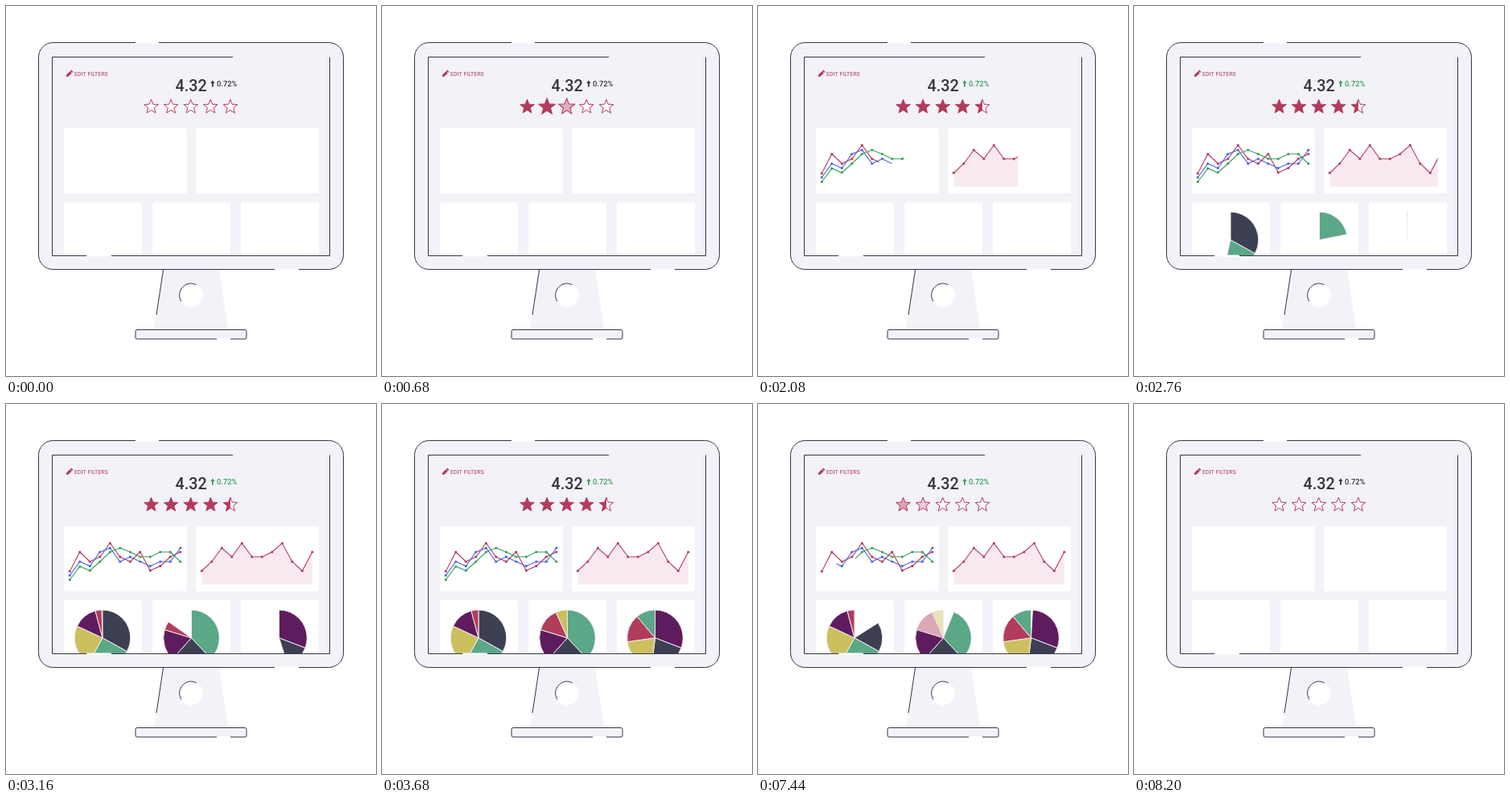
These frames come from a looping animation (460x460 px, 8240 ms). An HTML page with a canvas:

```html
<!DOCTYPE html>
<html lang="en">
<head>
<meta charset="utf-8">
<title>Rating dashboard</title>
<style>
html, body { margin: 0; width: 100%; height: 100%; overflow: hidden; background: #fff; }
canvas { display: block; width: 460px; height: 460px; }
</style>
</head>
<body>
<canvas id="stage"></canvas>
<script>
const LOOP = 8240;
const INK = '#35354a', PANEL = '#f2f2f8', RED = '#b43a5d';
const PIE = { dark: '#3c4052', green: '#5aa888', yellow: '#cbc05e', purple: '#5e1c5e', red: '#b23c5c' };

const canvas = document.getElementById('stage');
const c = canvas.getContext('2d');
const dpr = window.devicePixelRatio || 1;
canvas.width = canvas.height = 460 * dpr;

const progress = (t, start, dur) => Math.min(1, Math.max(0, (t - start) / dur));
const sine = p => (1 - Math.cos(Math.PI * p)) / 2;
const quad = p => p < .5 ? 2 * p * p : 1 - 2 * (1 - p) ** 2;
const mix = (a, b, p) => `rgb(${a.map((v, i) => Math.round(v + (b[i] - v) * p))})`;

function path(points, close) {
  c.beginPath();
  points.forEach(([x, y]) => c.lineTo(x, y));
  if (close) c.closePath();
}

function stroke(color, width = 1) {
  c.strokeStyle = color;
  c.lineWidth = width;
  c.stroke();
}

function fill(color) {
  c.fillStyle = color;
  c.fill();
}

function line(points, color = INK, width = 1) {
  path(points);
  stroke(color, width);
}

function box(x, y, w, h, r, color, edge) {
  c.beginPath();
  c.roundRect(x, y, w, h, r);
  fill(color);
  if (edge) stroke(edge);
}

function text(s, x, y, size, weight, color) {
  c.font = `${weight} ${size}px Roboto, sans-serif`;
  c.fillStyle = color;
  c.fillText(s, x, y);
}

function monitor() {
  path([[195, 328], [265, 328], [276, 402], [184, 402]], true);
  fill(PANEL);
  line([[195.5, 328], [187, 384]]);
  c.beginPath();
  c.arc(230, 359.5, 15, 0, 7);
  fill('#fff');
  c.beginPath();
  c.arc(230, 359.5, 14.5, 2.58, 5.2);
  stroke(INK);
  box(161, 402.5, 138, 11.5, 2, PANEL, INK);
  box(40.5, 45.5, 379, 282, 18, PANEL, INK);
  line([[161, 45.5], [190, 45.5]], '#fff', 2);
  line([[334, 327.5], [364, 327.5]], '#fff', 2);
  line([[262, 414], [279, 414]], '#fff', 2);
}

function bezel() {
  line([[282, 63.5], [57.5, 63.5], [57.5, 310.5], [402.5, 310.5], [402.5, 63.5]]);
  line([[100, 310.5], [131, 310.5]], '#fff', 2);
}

function header(tint) {
  c.save();
  c.translate(78.8, 84.2);
  c.rotate(-Math.PI / 4);
  path([[-5.5, 0], [-3.5, -1.6], [2.4, -1.6], [2.4, 1.6], [-3.5, 1.6]], true);
  fill(RED);
  c.fillRect(3, -1.6, 1.9, 3.2);
  c.restore();
  text('EDIT FILTERS', 85, 87.3, 7.05, 400, RED);
  text('4.32', 210.6, 105.8, 19.8, 500, '#36363f');
  text('0.72%', 262, 100, 9.3, 500, tint);
  path([[256.9, 92.6], [259.6, 96], [257.8, 96], [257.8, 100.6], [256, 100.6], [256, 96], [254.2, 96]], true);
  fill(tint);
}

const starPoints = Array.from({ length: 10 }, (_, i) => {
  const r = i % 2 ? 4 : 9.3, a = i * Math.PI / 5 - Math.PI / 2;
  return [r * Math.cos(a), r * Math.sin(a)];
});

function star(i, t) {
  const pop = progress(t, 160 + i * 220, 400);
  const gone = progress(t, 6930 + (4 - i) * 80, 360);
  const size = 1 + .2 * Math.sin(Math.PI * pop);
  c.save();
  c.translate(180.5 + i * 24.6, 125.4);
  c.scale(size, size);
  path(starPoints, true);
  fill('#fff');
  c.globalAlpha = Math.min(1, pop * 2) * (1 - gone);
  path(i < 4 ? starPoints : [...starPoints.slice(5), starPoints[0]], true);
  fill(RED);
  c.globalAlpha = 1;
  path(starPoints, true);
  stroke(RED);
  c.restore();
}

const STEP = 12.5, SPAN = STEP * 11;

// Reveals from the left, later erases from the left.
function chart(t, x, ys, color, [inStart, inDur, outStart, outDur], area) {
  const from = x + SPAN * progress(t, outStart, outDur);
  const to = x + SPAN * progress(t, inStart, inDur);
  if (to <= from) return;
  const points = ys.map((y, i) => [x + i * STEP, y]);
  c.save();
  c.beginPath();
  c.rect(from, 150, to - from, 84);
  c.clip();
  if (area) {
    path([...points, [x + SPAN, 224.5], [x, 224.5]], true);
    fill('#f7e9ee');
  }
  line(points, color, 1.1);
  c.restore();
  for (const [px, py] of points) {
    if (px < from || px > to) continue;
    c.beginPath();
    c.arc(px, py, 1.6, 0, 7);
    fill(color);
  }
}

const pies = [
  { x: 120, start: 2280, ends: [119, 209, 295, 345, 360], colors: ['dark', 'green', 'yellow', 'purple', 'red'] },
  { x: 230.5, start: 2476, ends: [137, 222, 287, 336, 360], colors: ['green', 'dark', 'purple', 'red', 'yellow'], fades: true },
  { x: 339.5, start: 2730, ends: [111, 187, 262, 320, 360], colors: ['purple', 'dark', 'yellow', 'red', 'green'] }
];

function pie({ x, start, ends, colors, fades }, i, t) {
  const from = 360 * quad(progress(t, 7232 + i * 80, 740));
  const to = 360 * sine(progress(t, start, 920));
  const angle = deg => (deg - 90) * Math.PI / 180;
  ends.forEach((end, k) => {
    const a = Math.max(from, k ? ends[k - 1] : 0), b = Math.min(to, end);
    if (b <= a) return;
    if (fades && k > 2) c.globalAlpha = 1 - progress(t, 7330, 200);
    c.beginPath();
    c.moveTo(x, 290.8);
    c.arc(x, 290.8, 34.8, angle(a), angle(b));
    c.closePath();
    fill(PIE[colors[k]]);
    stroke('#f3eaf0');
    c.globalAlpha = 1;
  });
}

function draw(t) {
  c.setTransform(dpr, 0, 0, dpr, 0, 0);
  c.fillStyle = '#fff';
  c.fillRect(0, 0, 460, 460);
  monitor();

  const tint = progress(t, 1500, 400) - progress(t, 7750, 300);
  const green = mix([51, 51, 63], [52, 158, 92], tint);
  header(green);
  for (let i = 0; i < 5; i++) star(i, t);

  for (const x of [72, 236]) box(x, 152, 153, 81, 2, '#fff');
  for (const x of [72, 182, 292]) box(x, 244, 97, 66, [2, 2, 0, 0], '#fff');

  chart(t, 79.3, [208, 184, 196, 190, 173, 190, 196, 184, 207, 201.5, 190, 184], RED, [1410, 1300, 7460, 690]);
  chart(t, 79.3, [213, 196, 201.5, 184, 179, 196, 190, 196, 201.5, 196, 196, 179], '#4a63e0', [1260, 1300, 7350, 690]);
  chart(t, 79.3, [218.5, 202, 207, 196, 184, 179, 184, 190, 190, 184, 184, 196], green, [1115, 1300, 7230, 690]);
  chart(t, 243.3, [207.5, 196, 179, 190, 173, 190, 190, 184, 173, 196, 207.5, 184], RED, [1080, 1720, 7460, 690], true);

  c.save();
  c.beginPath();
  c.rect(58, 244, 344, 66);
  c.clip();
  pies.forEach((p, i) => pie(p, i, t));
  c.restore();
  bezel();
}

const began = performance.now();
function tick() {
  draw((performance.now() - began) % LOOP);
  requestAnimationFrame(tick);
}
tick();
</script>
</body>
</html>
```
